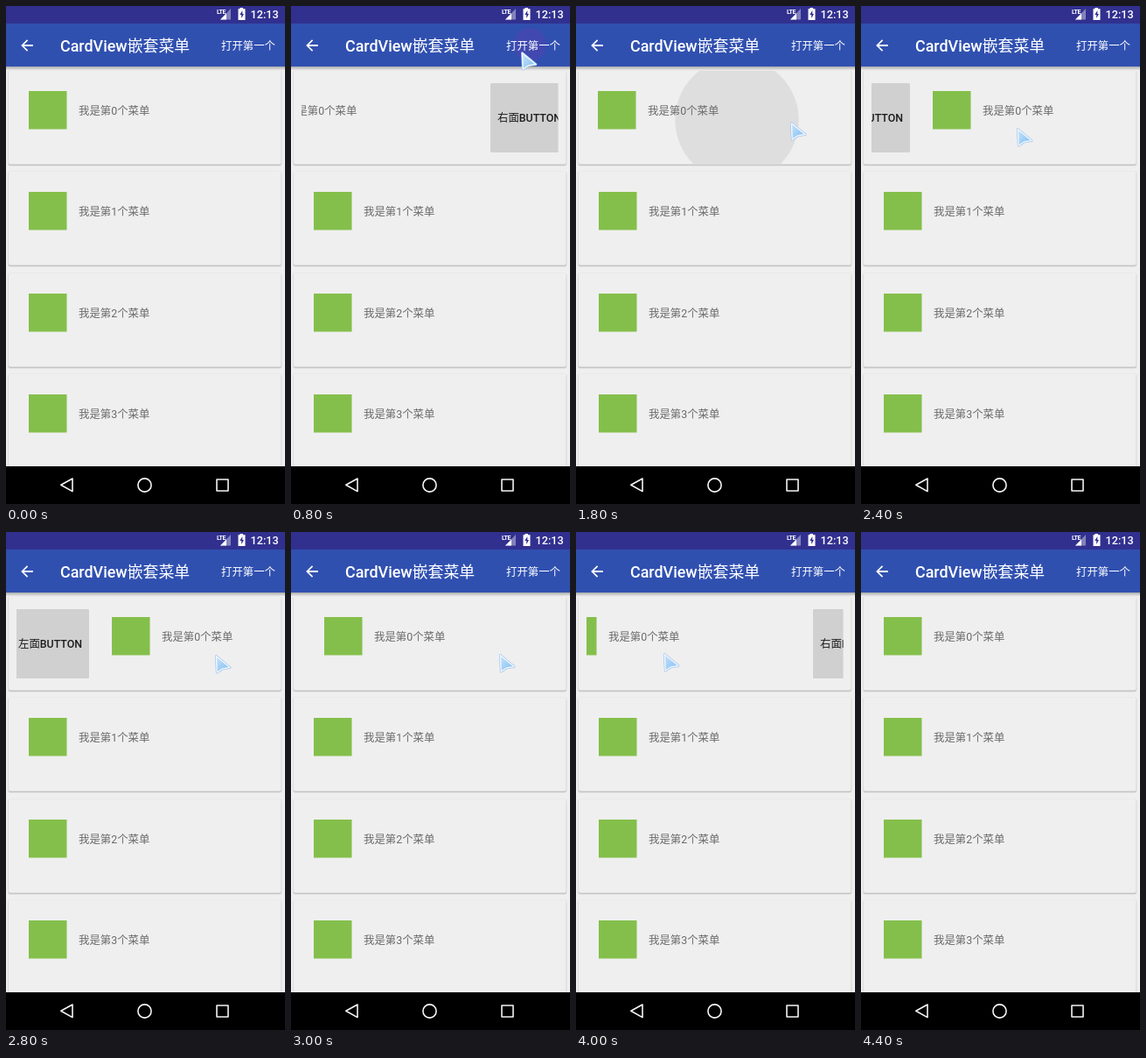
These frames come from a looping animation (319 by 568 pixels, 4.6 s). An HTML page:

```html
<!DOCTYPE html>
<html lang="zh-CN">
<head>
<meta charset="utf-8">
<title>CardView嵌套菜单</title>
<style>
html, body { margin: 0; width: 100%; height: 100%; overflow: hidden; background: #efefef; }
svg { display: block; width: 100%; height: 100%; }
text { font-family: Roboto, "Noto Sans CJK SC", "Noto Sans CJK", sans-serif; font-size: 12.4px; }
.medium { font-weight: 500; }
.label { fill: #6a6a6a; }
.button rect { fill: #d0d0d0; }
.button text { fill: #1c1c1c; font-weight: 500; }
</style>
</head>
<body>
<svg viewBox="0 0 319 568">
  <defs>
    <linearGradient id="shade" x2="0" y2="1">
      <stop offset="0" stop-color="#aaa"/>
      <stop offset="1" stop-color="#efefef"/>
    </linearGradient>
    <linearGradient id="glass" x2="1" y2="1">
      <stop offset="0" stop-color="#c9e4fb"/>
      <stop offset="1" stop-color="#7cbcf0"/>
    </linearGradient>
    <clipPath id="cardClip"><rect x="3" y="74" width="311" height="106.5" rx="2"/></clipPath>
    <clipPath id="rowClip"><rect x="12" y="80" width="293.5" height="95"/></clipPath>
    <path id="arrow" d="M1.3 1.5L17 14.6L8.8 15.8L2.2 20.2Z"/>
  </defs>

  <rect width="319" height="568" fill="#efefef"/>
  <rect y="69" width="319" height="4.5" fill="url(#shade)"/>
  <g id="cards"></g>

  <circle id="cardRipple" cx="184" cy="130" r="70.7" fill="#dedede" clip-path="url(#cardClip)"/>
  <g clip-path="url(#rowClip)"><g id="row"></g></g>

  <rect width="319" height="20" fill="#31308f"/>
  <rect y="20" width="319" height="49" fill="#3050b0"/>
  <circle id="barRipple" cx="273" cy="44" r="19" fill="#4149b0"/>
  <g fill="#fff">
    <text x="241" y="9" style="font-size:7px;font-weight:700" letter-spacing="-.5">LTE</text>
    <path d="M257 3V15.5H245Z" opacity=".4"/>
    <path d="M252 8.5V15.5H245Z"/>
    <path d="M267.5 3.2V2H271V3.2H273.5V16H265.5V3.2Z"/>
    <path d="M270.3 5L267.3 10H269.2V14L272 8.9H270.3Z" fill="#31308f"/>
    <text x="279.5" y="14" class="medium" style="font-size:12.7px">12:13</text>
    <path d="M30.8 44.1V45.9H20.6L25.2 50.5L24 51.8L17.2 45L24 38.2L25.2 39.5L20.6 44.1Z"/>
    <text x="62" y="52" class="medium" style="font-size:17.9px">CardView嵌套菜单</text>
    <text x="246" y="50">打开第一个</text>
  </g>

  <rect y="525" width="319" height="43" fill="#000"/>
  <g fill="none" stroke="#f4f4f4" stroke-width="1.6" stroke-linejoin="round">
    <path d="M62.8 546.3L76 539V553.6Z"/>
    <circle cx="158.5" cy="546.5" r="7.6"/>
    <rect x="241" y="540" width="13" height="13"/>
  </g>

  <g id="cursor" stroke-linejoin="round">
    <use href="#arrow" stroke="#9dbfe9" stroke-width="2.6"/>
    <use href="#arrow" fill="url(#glass)" stroke="#f4f9ff" stroke-width="1.3"/>
  </g>
</svg>
<script>
const $ = id => document.getElementById(id);
const STEP = 200, LOOP = 4600, PITCH = 115.6, OPEN = 95;

const item = n => `
  <rect x="26" y="97" width="43.5" height="43.5" fill="#84bf4b"/>
  <text x="83" y="124" class="label">我是第${n}个菜单</text>`;

const button = (x, label) => `
  <g class="button" transform="translate(${x} 88)">
    <rect width="89" height="79" rx="1.5"/>
    <text x="8" y="44.3">${label}</text>
  </g>`;

const card = n => `
  <g transform="translate(0 ${Math.floor(n * PITCH)})">
    <rect x="2" y="73.5" width="313.5" height="109" rx="2.5" fill="#dcdcdc"/>
    <rect x="3" y="76" width="311.5" height="106" rx="2" fill="#c6c6c6"/>
    <rect x="3" y="73.5" width="311.5" height="107" rx="2" fill="#efefef"/>
    ${n ? item(n) : ""}
  </g>`;

$("cards").innerHTML = [0, 1, 2, 3].map(card).join("");
$("row").innerHTML = button(-89, "左面BUTTON") + item(0) + button(317, "右面BUTTON");

// Each step holds [cursor x, cursor y, row offset].
const poses = [
  null, [251, 163, 0], [263, 66, 0], [263, 51, 0],
  [263, 52, -89], [242, 97, -OPEN], [138, 133, -OPEN], [155, 133, -OPEN],
  [200, 133, -46], [245, 132, -1], [237, 136, 0], [106, 137, 0],
  [178, 139, 56], [235, 141, OPEN], [239, 140, OPEN], [238, 139, 12],
  [262, 138, 0], [194, 132, -34], [91, 133, -OPEN], [40, 112, -OPEN],
  [100, 138, -46], [161, 164, 0], null
];

const show = (el, on) => el.setAttribute("visibility", on ? "visible" : "hidden");
const move = (el, x, y) => el.setAttribute("transform", `translate(${x} ${y})`);

function draw(ms) {
  const step = Math.floor(ms % LOOP / STEP);
  const pose = poses[step];
  const [x, y, offset] = pose || [0, 0, 0];
  show($("cursor"), pose);
  move($("cursor"), x, y);
  move($("row"), offset, 0);
  show($("barRipple"), step === 4);
  show($("cardRipple"), step === 9);
}

const start = performance.now();
function tick() {
  draw(performance.now() - start);
  requestAnimationFrame(tick);
}
tick();
</script>
</body>
</html>
```
